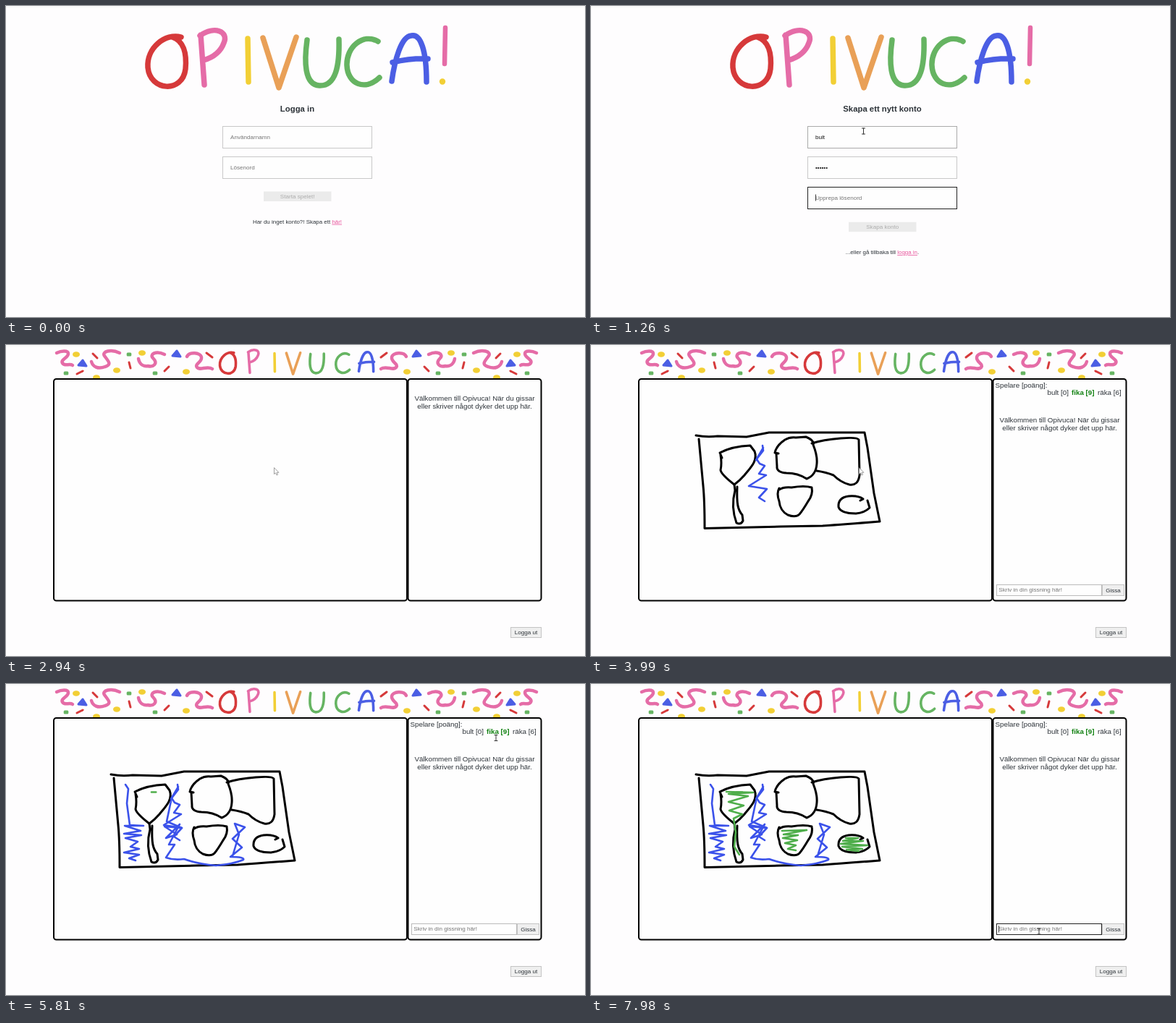
An HTML page that plays this animation: 800x430 px, repeating every 8 s.

```html
<!DOCTYPE html>
<html lang="sv">
<head>
<meta charset="utf-8">
<title>Opivuca</title>
<style>
  html, body { margin: 0; width: 100%; height: 100%; overflow: hidden; background: #fefdfe; }
  svg { display: block; width: 800px; height: 430px; font: 8.1px "Liberation Sans", Arial, sans-serif; }
  text { fill: #2c3238; white-space: pre; }
  .ink { stroke-linecap: round; stroke-linejoin: round; }
  .heading { font-weight: bold; font-size: 11.35px; }
  .note { font-size: 7.95px; }
  .chat { font-size: 9.8px; }
  .hint { fill: #757575; }
  .link { fill: #e8559c; text-decoration: underline; }
  .mid { text-anchor: middle; }
</style>
</head>
<body>
<svg id="stage" viewBox="0 0 800 430"></svg>
<script>
const STEP = 70, LOOP = 8000;
const stage = document.getElementById('stage');
const RED = '#d6393a', PINK = '#e56ca7', YELLOW = '#f2cf35', ORANGE = '#e9a057',
      GREEN = '#66b462', BLUE = '#4b5ee4';

function add(parent, tag, attrs = {}, content) {
  const el = document.createElementNS('http://www.w3.org/2000/svg', tag);
  for (const key in attrs) el.setAttribute(key, attrs[key]);
  if (content !== undefined) el.textContent = content;
  parent.appendChild(el);
  return el;
}
const group = (parent, transform = '') => add(parent, 'g', { transform });
const text = (parent, x, y, content, cls = '') => add(parent, 'text', { x, y, class: cls }, content);
const ink = (parent, d, stroke, width, fill = 'none') =>
  add(parent, 'path', { d, stroke, 'stroke-width': width, fill, class: 'ink' });
const box = (parent, x, y, width, height, fill, stroke, extra) =>
  add(parent, 'rect', { x, y, width, height, fill, stroke, ...extra });
const show = (el, on) => el.setAttribute('visibility', on ? 'visible' : 'hidden');

// Each letter: outline, colour, centre on the start pages, centre in the banner.
const letters = [
  ['M242 43C220 37 194 58 196 85C199 118 244 121 248 87C250 65 245 48 230 43', RED, 221, 306],
  ['M269 40L274 109M268 41C288 27 308 35 301 51C296 65 283 72 273 75', PINK, 286, 342],
  ['M334 45L335 105', YELLOW, 334, 371],
  ['M355 44L377 113L401 43', ORANGE, 378, 397],
  ['M416 47C412 76 412 109 433 110C456 111 461 82 460 46', GREEN, 438, 430],
  ['M514 49C493 37 470 57 471 82C472 108 496 118 516 99', GREEN, 493, 465],
  ['M533 104C537 75 546 42 560 41C573 38 581 62 581 105M534 78Q560 72 583 73', BLUE, 558, 498]
];

function confetti(parent) {
  for (const d of [
    'M70 11C76 8 86 7 86 12C86 18 75 20 78 25C81 30 88 25 92 28',
    'M157 11C145 5 132 9 136 15C141 22 147 27 137 30C127 34 120 30 118 23',
    'M219 13C207 7 198 13 203 18C211 26 203 31 196 29C188 30 184 25 183 19',
    'M250 16C253 9 269 10 270 17C271 24 260 26 264 31C268 36 278 28 285 33'
  ]) ink(parent, d, PINK, 4.5);
  for (const [x, y] of [[97, 13], [125, 45], [153, 35], [188, 11], [249, 37]])
    add(parent, 'ellipse', { cx: x, cy: y, rx: 5, ry: 3.8, fill: YELLOW });
  for (const [x, y] of [[83, 39], [170, 13], [206, 39]])
    box(parent, x - 3.3, y - 2.5, 6.6, 5, GREEN, 'none', { rx: 1.5 });
  for (const [x, y] of [[106, 25], [236, 12]])
    ink(parent, `M${x} ${y - 4}l5 8l-11 -1z`, BLUE, 3, BLUE);
  for (const [x, y, dx, dy] of [[102, 38, 4, -2], [123, 15, 3, 3], [171, 28, 1, 4], [222, 33, 3, -3], [281, 14, 4, 3]])
    ink(parent, `M${x - dx} ${y - dy}L${x + dx} ${y + dy}`, RED, 3);
}

function field(parent, y, hint) {
  const frame = box(parent, 299.5, y, 206, 30, '#fefefe', '#c8c8c8');
  const label = text(parent, 310, y + 17, hint);
  const caret = box(parent, 310, y + 10, 0.8, 9, '#111', 'none');
  return (value, focused, hover) => {
    label.textContent = value || hint;
    label.style.fill = value ? '#111' : '#757575';
    frame.setAttribute('stroke', focused ? '#222' : hover ? '#aaa' : '#c8c8c8');
    caret.setAttribute('x', 310 + (value ? label.getComputedTextLength() : 0));
    show(caret, focused);
  };
}

function submitButton(parent, y, caption) {
  box(parent, 356, y, 93.5, 13.5, '#ebebeb', 'none');
  const label = text(parent, 402.7, y + 9.5, caption, 'mid');
  return ready => { label.style.fill = ready ? '#222' : '#acacac'; };
}

function smallButton(parent, x, y, width, height, caption) {
  box(parent, x, y, width, height, '#efefef', '#c4c4c4');
  text(parent, x + width / 2, y + height / 2 + 2.6, caption, 'mid');
}

function note(parent, y, before, link, after = '') {
  const line = text(parent, 402.5, y, before, 'note mid');
  add(line, 'tspan', { class: 'link' }, link);
  add(line, 'tspan', {}, after);
}

box(stage, 0, 0, 800, 3, '#fafafa', 'none');

// Start pages
const start = group(stage);
for (const [d, colour] of letters) ink(start, d, colour, 7.5);
ink(start, 'M607 30L606 80', PINK, 6.5);
add(start, 'circle', { cx: 603, cy: 104.5, r: 4.2, fill: YELLOW });

const login = group(stage);
text(login, 402.5, 145.5, 'Logga in', 'heading mid');
const loginName = field(login, 166.5, 'Användarnamn');
const loginPass = field(login, 208.5, 'Lösenord');
const loginButton = submitButton(login, 256.5, 'Starta spelet!');
note(login, 300.7, 'Har du inget konto?! Skapa ett ', 'här!');

const signup = group(stage);
text(signup, 402.5, 145.5, 'Skapa ett nytt konto', 'heading mid');
const newName = field(signup, 166.5, 'Användarnamn');
const newPass = field(signup, 208.5, 'Lösenord');
const newRepeat = field(signup, 250.5, 'Upprepa lösenord');
const newButton = submitButton(signup, 298.7, 'Skapa konto');
note(signup, 343, '...eller gå tillbaka till ', 'logga in', '.');

// Game page
const game = group(stage);
confetti(game);
confetti(group(game, 'matrix(-1 0 0 1 803 0)'));
for (const [d, colour, from, to] of letters)
  ink(group(game, `translate(${to} 25) scale(.42) translate(${-from} -77)`), d, colour, 8.5);
box(game, 66, 47, 488, 306.5, '#fefefe', '#000', { rx: 3.5, 'stroke-width': 2 });
box(game, 555.5, 47, 184, 306.5, '#fefefe', '#000', { rx: 3.5, 'stroke-width': 2 });
smallButton(game, 697.5, 390.5, 42, 14, 'Logga ut');
const welcome = group(game);
text(welcome, 647.5, 76.7, 'Välkommen till Opivuca! När du gissar', 'chat mid');
text(welcome, 647.5, 87.7, 'eller skriver något dyker det upp här.', 'chat mid');

const round = group(game);
text(round, 558.5, 59, 'Spelare [poäng]:', 'chat');
text(round, 630.5, 68.8, 'bult [0]', 'chat');
const leader = text(round, 664, 68.8, 'fika [9]', 'chat');
leader.style.cssText = 'font-weight:bold;fill:#108010';
text(round, 700, 68.8, 'räka [6]', 'chat');
const guessFrame = box(round, 560.5, 331.5, 145, 15, '#fefefe', '#bbb');
text(round, 563.3, 341.4, 'Skriv in din gissning här!', 'hint');
const guessCaret = box(round, 563, 334, 0.8, 9.5, '#111', 'none');
smallButton(round, 706.5, 331.5, 30, 15, 'Gissa');

for (const d of [
  'M145 125Q160 128 175 126L215 127L246 121L378 121L382 142L391 205L399 244Q350 248 320 250L262 251L157 253.5Q157 215 155 195L149 130',
  'M181 156L178 149Q195 140 220 139L226 147C231 160 220 170 212 180Q206 187 198 193Q180 179 179 173Q181 164 179 152',
  'M198 193L199 201C194 220 197 235 201 246Q207 249 210 243L209 235C203 228 201 220 202 196',
  'M259 150L254 149Q256 139 268 131Q275 127 283 128L297 127Q309 132 307 138Q313 153 312 164Q311 180 298 185Q286 177 270 177Q256 176 257 168L256 150',
  'M305 136Q320 131 345 129Q368 127 370 131L371 180Q369 195 357 193Q345 190 335 180Q325 176 312 174',
  'M260 200Q266 196 277 197Q295 194 305 197Q307 207 300 216Q293 228 288 234Q283 239 272 235Q261 229 260 216Q256 205 260 198',
  'M382 215L385 225Q378 232 366 233Q345 233 342 224Q341 211 356 209Q370 208 376 213L372 215'
]) ink(round, d, '#000', 3);

const PEN_BLUE = '#3b52ea', PEN_GREEN = '#4fae4b';
// Strokes that appear along their length: start, end, colour, outline.
const strokes = [
  [3640, 3990, PEN_BLUE, 'M237 139L238 146L228 159L238 142L229 158L233 164L240 167L232 178L242 180L218 195L243 199L232 211L240 216'],
  [3990, 5040, PEN_BLUE, 'M229 157L222 190L243 199L219 197L236 208L221 213L240 194L225 222L233 222L221 240Q232 244 246 242Q265 249 290 251Q314 249 328 243Q330 239 310 239L326 226L313 214L330 198L316 193L322 208L313 238'],
  [5110, 5670, PEN_BLUE, 'M165 139L169 145L167 165L171 195L190 196L164 196L186 203L163 207L187 209L165 213L182 218L172 225L184 228L163 233L184 236L170 241L179 244'],
  [5740, 5830, PEN_GREEN, 'M201 149.5L209 149.5'],
  [5880, 6440, PEN_GREEN, 'M187 149L224 150L190 152L217 155L190 163L211 168L191 175L209 180L197 186L200 205L198 225L205 236'],
  [6510, 6930, PEN_GREEN, 'M264 203L298 202L266 208L286 209L265 213L285 216L268 220L283 223L272 228L283 230'],
  [7000, 7420, PEN_GREEN, 'M352 213L369 213L348 217L376 217L345 221L382 223L347 225L375 228L353 229L370 231']
].map(([from, to, colour, d]) => {
  const path = ink(round, d, colour, 2.6);
  return { from, to, path, length: path.getTotalLength() };
});

// Pointers, each drawn around its hot spot
const pointers = {
  arrow: ink(stage, 'M0 0V8.5L2 6.8L3.5 10L5 9.3L3.6 6.3H6Z', '#888', 0.8, '#fff'),
  beam: ink(stage, 'M-2 -4H2M0 -4V4M-2 4H2', '#333', 1),
  hand: ink(stage, 'M0 0V6L-2 5L1 9.5H6V4L2 3V0Z', '#555', 0.8, '#fff')
};

const track = [
  [70, 618, 409, 'arrow'], [280, 457, 297, 'hand'], [350, 457, 297, 'arrow'],
  [560, 376.5, 173, 'beam'], [2590, 370.5, 170, 'arrow'], [5180, 370.5, 170, 'arrow'],
  [5600, 677, 74.5, 'beam'], [6790, 677, 74.5, 'arrow'], [7140, 760, 220, 'arrow'],
  [7490, 619, 342, 'beam'], [LOOP, 619, 342, 'beam']
];

function movePointer(t) {
  const i = track.findLastIndex(key => key[0] <= t);
  for (const name in pointers) show(pointers[name], i >= 0 && track[i][3] === name);
  if (i < 0) return;
  const [t0, x0, y0, name] = track[i], [t1, x1, y1] = track[i + 1];
  const p = (t - t0) / (t1 - t0);
  const k = name === 'beam' ? 0 : p * p * (3 - 2 * p);
  pointers[name].setAttribute('transform', `translate(${x0 + (x1 - x0) * k} ${y0 + (y1 - y0) * k})`);
}

const typed = (word, from, t, pace = STEP) =>
  word.slice(0, Math.max(0, Math.floor((t - from) / pace) + 1));
const DOTS = '••••••';

function render(t) {
  const page = t >= 2590 ? game : t >= 350 && t < 1750 ? signup : login;
  for (const g of [login, signup, game]) g.style.display = g === page ? '' : 'none';
  start.style.display = page === game ? 'none' : '';

  if (page === signup) {
    newName(typed('bult', 630, t), t >= 560 && t < 910, t >= 490);
    newPass(typed(DOTS, 980, t, 50), t >= 910 && t < 1260);
    newRepeat(typed(DOTS, 1330, t, 50), t >= 1260);
    newButton(t >= 1580);
  } else if (page === login) {
    const back = t >= 1750;
    loginName(back ? typed('bult', 2030, t) : '', t >= 1960 && t < 2310, back);
    loginPass(back ? typed(DOTS, 2310, t, 35) : '', t >= 2310);
    loginButton(t >= 2450);
  } else {
    const playing = t >= 3430, focused = t >= 7560;
    round.style.display = playing ? '' : 'none';
    welcome.setAttribute('transform', `translate(0 ${playing ? 30.5 : 0})`);
    guessFrame.setAttribute('stroke', focused ? '#222' : '#bbb');
    guessCaret.style.display = focused ? '' : 'none';
    for (const { from, to, path, length } of strokes) {
      const p = Math.min(1, (t - from) / (to - from));
      path.style.display = p > 0 ? '' : 'none';
      path.setAttribute('stroke-dasharray', p < 1 ? `${Math.max(0, p) * length} ${length * 2}` : 'none');
    }
  }
  movePointer(t);
}

const begun = performance.now();
function tick() {
  const t = (performance.now() - begun) % LOOP;
  render(Math.floor(t / STEP) * STEP);
  requestAnimationFrame(tick);
}
tick();
</script>
</body>
</html>
```
